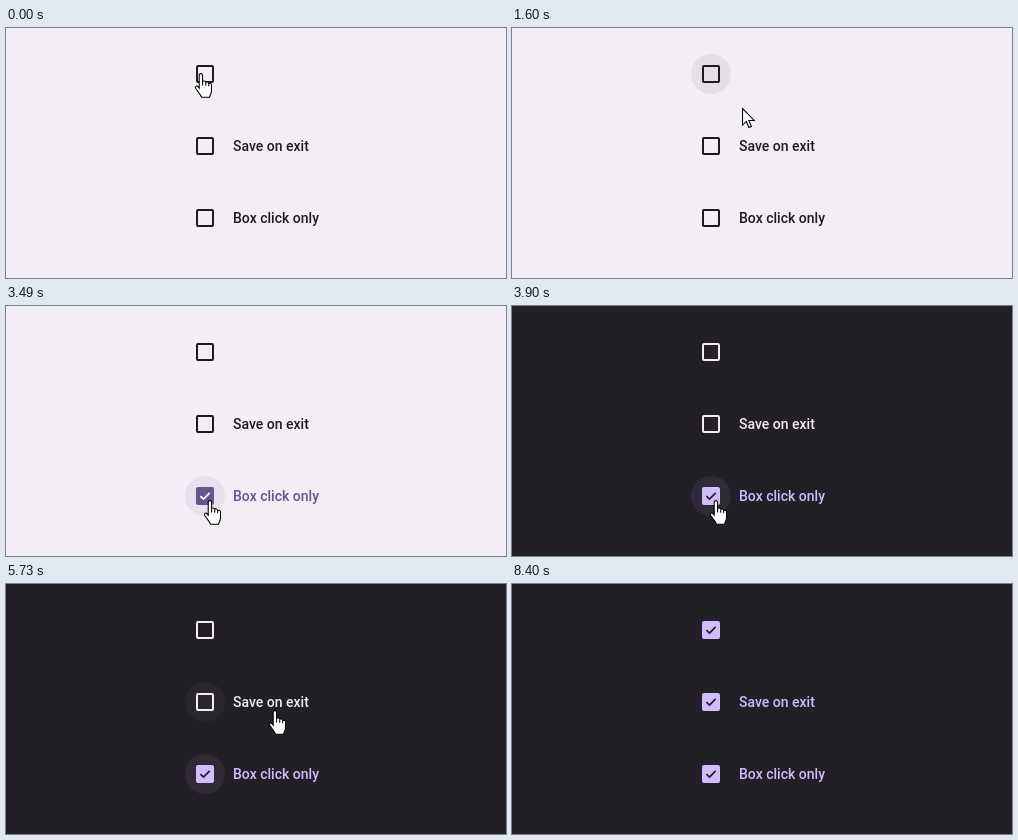
Recreate the animation shown at these times as an HTML page with a canvas. Size 500 px wide and 250 px high, loop 8.7 s.

```html
<!DOCTYPE html>
<html lang="en">
<head>
<meta charset="utf-8">
<title>Checkboxes</title>
<style>
  html, body { margin: 0; width: 100%; height: 100%; overflow: hidden; background: #f3edf5; }
  canvas { display: block; width: 500px; height: 250px; }
</style>
</head>
<body>
<canvas id="stage"></canvas>
<script>
const LOOP = 8700, DARK_AT = 3900, POINTER_GONE = 8170;
const BOX_X = 199, LABEL_X = 227, FIRST_Y = 46, ROW_GAP = 72;
const REST = 215, LAYER_ALPHA = 0.08;

const labels = ['', 'Save on exit', 'Box click only'];
const light = { bg: '#f3edf5', ink: '#1d1b20', primary: '#65558f', tick: '#ffffff' };
const dark = { bg: '#221f26', ink: '#f2ecf4', primary: '#d0bcff', tick: '#221f26' };

const rowY = row => FIRST_Y + row * ROW_GAP;
const clamp = v => Math.max(0, Math.min(1, v));
const ease = u => u * u * (3 - 2 * u);

// The pointer rests at each stop, then leaves on its last click there.
const stop = (x, y, arrive, clicks = [], rest = REST) => ({
  x, y, arrive, clicks,
  row: Math.round((y - FIRST_Y) / ROW_GAP),
  leave: clicks.length ? clicks[clicks.length - 1] : arrive + rest
});

const stops = [
  stop(194, 45, 0, [], 60),
  stop(167, 46, 150),
  stop(198, 48, 620, [780]),
  stop(209, 55, 1120, [1320]),
  stop(264, 120, 1980, [2110, 2360]),
  stop(220, 194, 2880),
  stop(203, 194, 3310, [3490, 4370]),
  stop(296, 181, 4750, [], 0),
  stop(210, 187, 5320, [5460]),
  stop(279, 115, 5820, [5980, 6380]),
  stop(240, 52, 7130, [], 0),
  stop(212, 45, 7250, [7410]),
  stop(234, 123, 7820, [8000]),
  stop(402, 226, 8200)
];

const arrow = new Path2D('M.5 .5V16.2L4.1 12.8 6.6 18.6 9 17.6 6.5 11.9H11.6Z');
const hand = new Path2D('M4.5 14.5V2.2a1.6 1.6 0 0 1 3.2 0V8.6c0-1.5 3-1.4 3 .2v.5' +
  'c.2-1.3 2.8-1.1 2.8.6v.6c.2-1.1 2.7-.9 2.7.8v5.5c0 2.7-1.2 3.8-1.9 6.2H6.6' +
  'C5.8 20.2 3 17.6 1.2 14.8 .2 13 2 11.6 3.4 13Z');
const knuckles = new Path2D('M7.7 8.6V12M10.7 9.3V12.2M13.5 10.5V12.6');

const canvas = document.getElementById('stage');
const ctx = canvas.getContext('2d', { alpha: false });
const dpr = window.devicePixelRatio || 1;
canvas.width = 500 * dpr;
canvas.height = 250 * dpr;

function pointerAt(t) {
  const next = stops.findIndex(s => s.arrive > t);
  const b = stops[next], a = stops[next - 1];
  const u = ease(clamp((t - a.leave) / (b.arrive - a.leave)));
  return {
    x: Math.round(a.x + (b.x - a.x) * u),
    y: Math.round(a.y + (b.y - a.y) * u)
  };
}

function isChecked(row, t) {
  const clicks = stops.filter(s => s.row === row).flatMap(s => s.clicks);
  return clicks.filter(c => c <= t).length % 2 === 1;
}

// The round layer comes up as the pointer settles and lingers after it leaves.
function layerAt(row, t) {
  const levels = stops
    .filter(s => s.row === row && s.clicks.length)
    .map(s => clamp((t - s.arrive + 150) / 150) * clamp((s.leave + 400 - t) / 150));
  return Math.max(...levels);
}

function drawRow(label, row, t, theme) {
  const checked = isChecked(row, t);
  const color = checked ? theme.primary : theme.ink;
  ctx.save();
  ctx.translate(BOX_X, rowY(row));

  ctx.globalAlpha = LAYER_ALPHA * layerAt(row, t);
  ctx.fillStyle = color;
  ctx.beginPath();
  ctx.arc(0, 0, 20, 0, Math.PI * 2);
  ctx.fill();
  ctx.globalAlpha = 1;

  ctx.beginPath();
  if (checked) {
    ctx.roundRect(-9, -9, 18, 18, 2);
    ctx.fill();
    ctx.beginPath();
    ctx.moveTo(-4.6, 0.1);
    ctx.lineTo(-1.5, 3.1);
    ctx.lineTo(4.7, -3.2);
    ctx.strokeStyle = theme.tick;
    ctx.lineWidth = 1.8;
  } else {
    ctx.roundRect(-8, -8, 16, 16, 1);
    ctx.strokeStyle = color;
    ctx.lineWidth = 2;
  }
  ctx.stroke();

  ctx.font = '500 14px Roboto, sans-serif';
  ctx.fillText(label, LABEL_X - BOX_X, 5);
  ctx.restore();
}

function overTarget({ x, y }) {
  const near = row => Math.abs(y - rowY(row)) <= 20;
  const onBox = Math.abs(x - BOX_X) <= 20 && labels.some((_, row) => near(row));
  const onLabel = x >= BOX_X && x <= 303 && near(1);
  return onBox || onLabel;
}

function drawPointer(t) {
  if (t >= POINTER_GONE) return;
  const p = pointerAt(t), linked = overTarget(p);
  const shape = linked ? hand : arrow;
  ctx.save();
  ctx.translate(p.x - (linked ? 5.5 : 0), p.y);
  ctx.scale(1.05, 1.05);
  ctx.fillStyle = '#fff';
  ctx.strokeStyle = '#000';
  ctx.lineWidth = 1;
  ctx.fill(shape);
  ctx.stroke(shape);
  if (linked) ctx.stroke(knuckles);
  ctx.restore();
}

function draw(now) {
  const t = now % LOOP;
  const theme = t < DARK_AT ? light : dark;
  ctx.setTransform(dpr, 0, 0, dpr, 0, 0);
  ctx.fillStyle = theme.bg;
  ctx.fillRect(0, 0, 500, 250);
  labels.forEach((label, row) => drawRow(label, row, t, theme));
  drawPointer(t);
}

let start;
function tick(now) {
  start ??= now;
  draw(now - start);
  requestAnimationFrame(tick);
}
draw(0);
requestAnimationFrame(tick);
</script>
</body>
</html>
```
